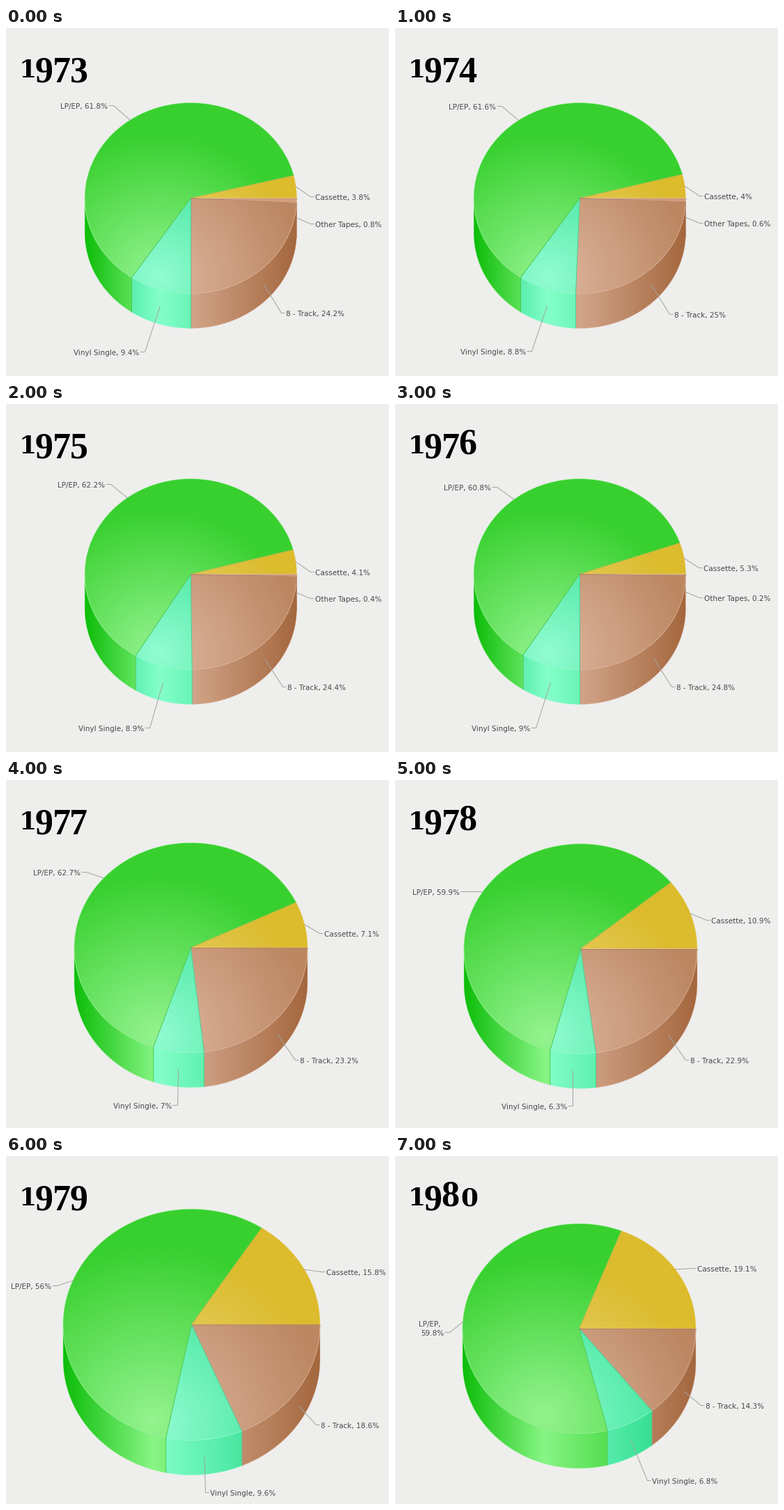
Write a matplotlib script that moves like this. It is 550 px wide and 500 px high and loops after 8000 ms.

```python
import numpy as np
import matplotlib.pyplot as plt
from matplotlib.animation import FuncAnimation
from matplotlib.colors import to_rgb
from matplotlib.patches import Polygon

W, H, DPI = 550, 500, 100
PX = 72 / DPI
DEPTH, TILT = 50, 0.9
LIGHT_X, LIGHT_Y, LIGHT_R = -0.3, 0.75, 1.36   # in pie radii

# face base, face highlight, wall base, wall highlight
COLORS = {
    "Cassette": ("#dcbb2c", "#ecd680", "#b89a1c", "#ecd680"),
    "LP/EP": ("#38d02f", "#94f38f", "#0cbd08", "#88f585"),
    "Vinyl Single": ("#30df90", "#92fcd2", "#16d27c", "#84ffca"),
    "8 - Track": ("#bc8661", "#dfb7a0", "#a4673e", "#e0b79f"),
    "Other Tapes": ("#d39f7c", "#e2bca4", "#b57950", "#e2bca4"),
}

# Shares in percent, counterclockwise from three o'clock
SHARES = {
    1973: (3.8, 61.8, 9.4, 24.2, 0.8),
    1974: (4.0, 61.6, 8.8, 25.0, 0.6),
    1975: (4.1, 62.2, 8.9, 24.4, 0.4),
    1976: (5.3, 60.8, 9.0, 24.8, 0.2),
    1977: (7.1, 62.7, 7.0, 23.2),
    1978: (10.9, 59.9, 6.3, 22.9),
    1979: (15.8, 56.0, 9.6, 18.6),
    1980: (19.1, 59.8, 6.8, 14.3),
}

# Centre and horizontal radius, where they leave the default
PIES = {
    1977: (265.5, 241, 167.5),
    1978: (266.5, 242.5, 167.5),
    1979: (266.5, 242.3, 184.5),
    1980: (264.5, 248, 167.5),
}
SMALL_PIE = (265.3, 244.5, 152.2)

YEARS = list(SHARES)
X, Y = np.meshgrid(np.arange(W) + 0.5, np.arange(H) + 0.5)

fig = plt.figure(figsize=(W / DPI, H / DPI), dpi=DPI, facecolor="#eeeeed")
ax = fig.add_axes([0, 0, 1, 1])


def mix(a, b, t):
    a, b = np.array(to_rgb(a)), np.array(to_rgb(b))
    return a + (b - a) * np.clip(t, 0, 1)[..., None]


def rim(pie, degrees):
    cx, cy, r = pie
    a = np.radians(degrees)
    return np.column_stack([cx + r * np.cos(a), cy - TILT * r * np.sin(a)])


def fill(points, image, edge):
    """Gradient image clipped to a softly outlined polygon."""
    shape = Polygon(points, fc="none", ec=edge, lw=0.8 * PX, alpha=0.5,
                    joinstyle="round", zorder=2)
    ax.add_patch(shape)
    picture = ax.imshow(image, extent=(0, W, H, 0), aspect="auto", zorder=1)
    picture.set_clip_path(shape)


def draw_slice(pie, start, end, colors):
    cx, cy, r = pie
    face, face_light, wall, wall_light = colors
    dx = (X - cx) / r - LIGHT_X
    dy = (Y - cy) / r - LIGHT_Y
    glow = mix(face_light, face, np.hypot(dx, dy) / LIGHT_R)

    if end > 180:
        arc = rim(pie, np.linspace(max(start, 180), end, 120))
        across = np.abs(dx) / (1 + np.sign(-dx) * LIGHT_X)
        fill(np.vstack([arc, arc[::-1] + (0, DEPTH)]),
             mix(wall_light, wall, across), face_light)

    arc = rim(pie, np.linspace(start, end, 240))
    fill(np.vstack([(cx, cy), arc]), glow, face_light)


def draw_border(pie, angle, color):
    """Line from the centre to the rim, and down the wall in front."""
    x, y = rim(pie, np.array([angle]))[0]
    points = [pie[:2], (x, y)]
    if 180 < angle < 359:
        points.append((x, y + DEPTH))
    ax.plot(*zip(*points), color=np.array(to_rgb(color)) * 0.88,
            lw=0.9 * PX, alpha=0.8, zorder=3)


def bend_of(x, y, angle):
    """Point where a leader line turns horizontal."""
    c, s = np.cos(np.radians(angle)), np.sin(np.radians(angle))
    reach = np.clip(5 * abs(c) - 0.45, 0, 1)
    ex = x + np.sign(c) * reach * (19 + 6 * abs(2 * s * c))
    drop = 15 - 54 * s * s if s > 0 else 8 + s * s * (42 + 20 * reach)
    return ex, y + drop


def draw_label(pie, angle, name, share):
    x, y = rim(pie, np.array([angle]))[0]
    if angle > 180:
        y += DEPTH / 2
    ex, ey = np.round(bend_of(x, y, angle))
    right = ex > pie[0]
    tail = ex + 5 if right else ex - 6
    ax.plot([x, ex + 0.5, tail], [y, ey + 0.5, ey + 0.5], color="#a3a3a0",
            lw=PX, zorder=4)
    style = dict(family="DejaVu Sans", size=10.35 * PX, color="#484848",
                 va="baseline", ha="left" if right else "right", zorder=5)
    tx, ty = (ex + 7 if right else ex - 8), ey + 5
    text = f"{name}, {share:g}%"
    if not right and tx < 6 * len(text):
        ax.text(tx - 4, ty - 13, f"{name},", **style)
        text = f"{share:g}%"
    ax.text(tx, ty, text, **style)


def draw_year(year):
    """Old-style figures: 0 and 1 small, 6 and 8 rising, the rest hanging."""
    x = 21
    for digit in str(year):
        small = digit in "01"
        width = {"0": 30, "1": 21}.get(digit, 25)
        ax.text(x + width / 2, 71 if digit in "0168" else 78, digit,
                ha="center", va="baseline", weight="bold", color="black",
                family="DejaVu Serif" if small else "Liberation Serif",
                size=(36 if small else 52) * PX, zorder=5)
        x += width


def update(i):
    year = YEARS[i]
    ax.clear()
    ax.axis("off")
    pie = PIES.get(year, SMALL_PIE)
    shares = SHARES[year]
    bounds = np.cumsum((0,) + shares) / sum(shares) * 360
    parts = list(zip(COLORS, shares, bounds, bounds[1:]))
    for name, _, start, end in parts:
        draw_slice(pie, start, end, COLORS[name])
    for name, share, start, end in parts:
        draw_border(pie, end, COLORS[name][0])
        draw_label(pie, (start + end) / 2, name, share)
    draw_year(year)
    ax.set_xlim(0, W)
    ax.set_ylim(H, 0)
    return []


anim = FuncAnimation(fig, update, frames=len(YEARS), interval=1000,
                     repeat=True, repeat_delay=0)
plt.show()
```
